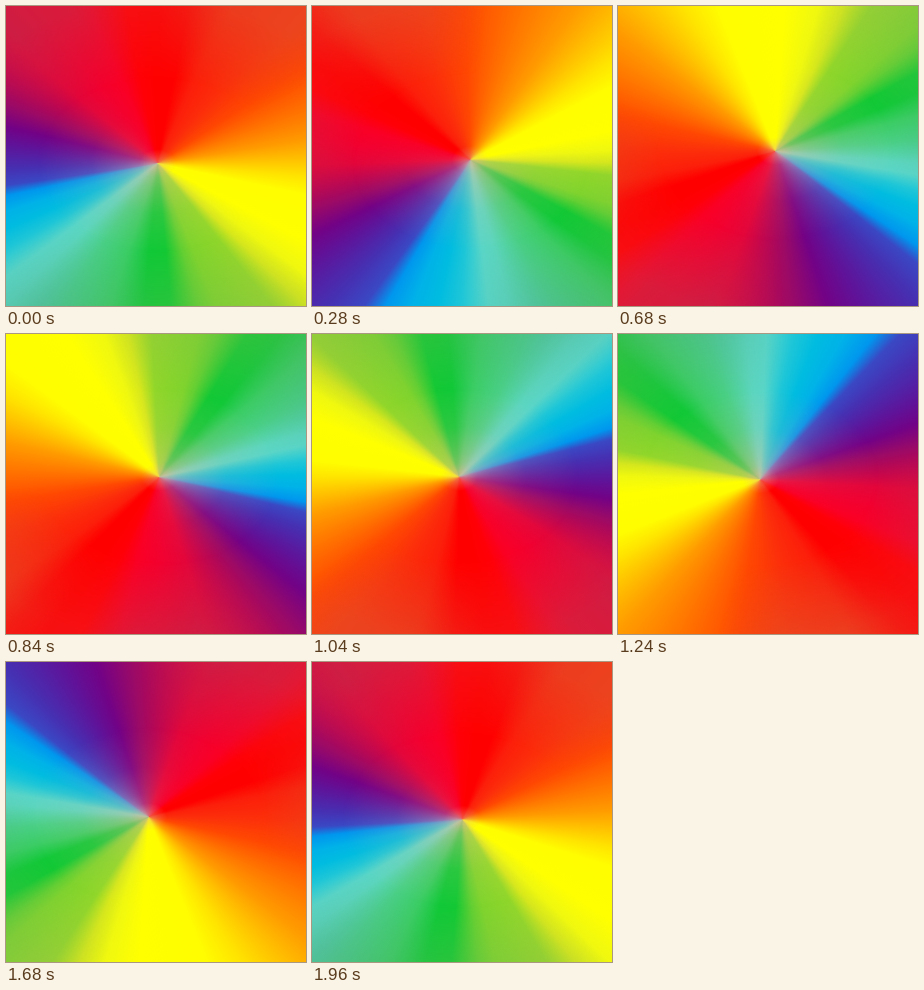
Animation, 300 px wide and 300 px high, one loop 2000 ms. Source, as an HTML page:

```html
<!DOCTYPE html>
<html lang="en">
<head>
<meta charset="utf-8">
<title>Spinning colour wheel</title>
<style>
  html, body {
    margin: 0;
    width: 100%;
    height: 100%;
    overflow: hidden;
    background: #f00;
  }
  .stage {
    position: relative;
    width: 300px;
    height: 300px;
    overflow: hidden;
  }
  /* The turning disc is seen wider than it is tall. */
  .stretch {
    position: absolute;
    inset: -50px;
    transform: scaleX(1.333);
  }
  /* The hub sits slightly off the axis, so it wobbles as it turns. */
  .wheel {
    --hub: 201.2px 207.3px;
    position: absolute;
    inset: 0;
    background: conic-gradient(from 0deg at var(--hub),
      rgb(255 0 0) 0deg, rgb(255 0 0) 8deg,
      rgb(252 30 10) 18deg, rgb(252 48 10) 34deg,
      rgb(255 72 2) 49deg, rgb(255 112 0) 63deg,
      rgb(255 155 0) 78deg, rgb(255 190 0) 87deg,
      rgb(255 228 0) 97deg, rgb(255 253 0) 106deg,
      rgb(255 255 0) 125deg, rgb(240 248 15) 135deg,
      rgb(215 232 28) 142deg, rgb(145 215 42) 149deg,
      rgb(128 212 45) 163deg, rgb(100 208 50) 168deg,
      rgb(18 201 52) 176deg, rgb(16 201 55) 184deg,
      rgb(58 206 100) 194deg, rgb(74 208 135) 207deg,
      rgb(92 214 190) 219deg, rgb(90 214 200) 225deg,
      rgb(30 198 215) 233deg, rgb(0 188 224) 240deg,
      rgb(0 178 232) 247deg, rgb(0 150 238) 254deg,
      rgb(58 72 196) 259deg, rgb(70 48 178) 267deg,
      rgb(94 20 154) 279deg, rgb(114 2 134) 288deg,
      rgb(155 10 102) 298deg, rgb(185 8 84) 306deg,
      rgb(228 6 58) 318deg, rgb(242 2 48) 330deg,
      rgb(250 0 38) 342deg, rgb(255 0 8) 351deg,
      rgb(255 0 0) 360deg);
    animation: spin 2s steps(50, end) infinite;
  }
  .wheel::before, .wheel::after {
    content: "";
    position: absolute;
    inset: 0;
    -webkit-mask-image: var(--fade);
    mask-image: var(--fade);
  }
  /* Pale haze around the hub, strongest over the cool colours. */
  .wheel::before {
    --fade: radial-gradient(circle at var(--hub), #000 5px, rgb(0 0 0 / .6) 24px, rgb(0 0 0 / .22) 50px, transparent 90px);
    background:
      radial-gradient(circle at var(--hub), rgb(228 180 140 / .5), rgb(228 180 140 / 0) 14px),
      conic-gradient(from 0deg at var(--hub),
        rgb(225 190 130 / 0) 125deg, rgb(225 205 120 / .5) 150deg,
        rgb(205 190 140 / .65) 185deg, rgb(205 195 165 / .7) 235deg,
        rgb(210 150 165 / .75) 260deg, rgb(220 80 115 / .75) 290deg,
        rgb(240 60 90 / .4) 320deg, rgb(245 50 60 / 0) 345deg);
  }
  /* Duller tones towards the rim of some sectors. */
  .wheel::after {
    --fade: radial-gradient(circle at var(--hub), transparent 85px, #000 165px);
    background: conic-gradient(from 0deg at var(--hub),
      rgb(235 40 40 / .4) 0deg, rgb(225 80 45 / .6) 20deg,
      rgb(225 80 45 / .6) 38deg, rgb(225 80 45 / 0) 55deg,
      rgb(150 190 75 / 0) 135deg, rgb(150 190 75 / .4) 150deg,
      rgb(90 185 80 / .4) 180deg, rgb(80 170 150 / .45) 212deg,
      rgb(80 170 150 / 0) 230deg,
      rgb(190 45 75 / 0) 300deg, rgb(190 45 75 / .6) 320deg,
      rgb(200 45 70 / .6) 338deg, rgb(235 40 40 / .4) 352deg);
  }
  @keyframes spin {
    to { transform: rotate(-360deg); }
  }
</style>
</head>
<body>
<div class="stage"><div class="stretch"><div class="wheel"></div></div></div>
</body>
</html>
```
